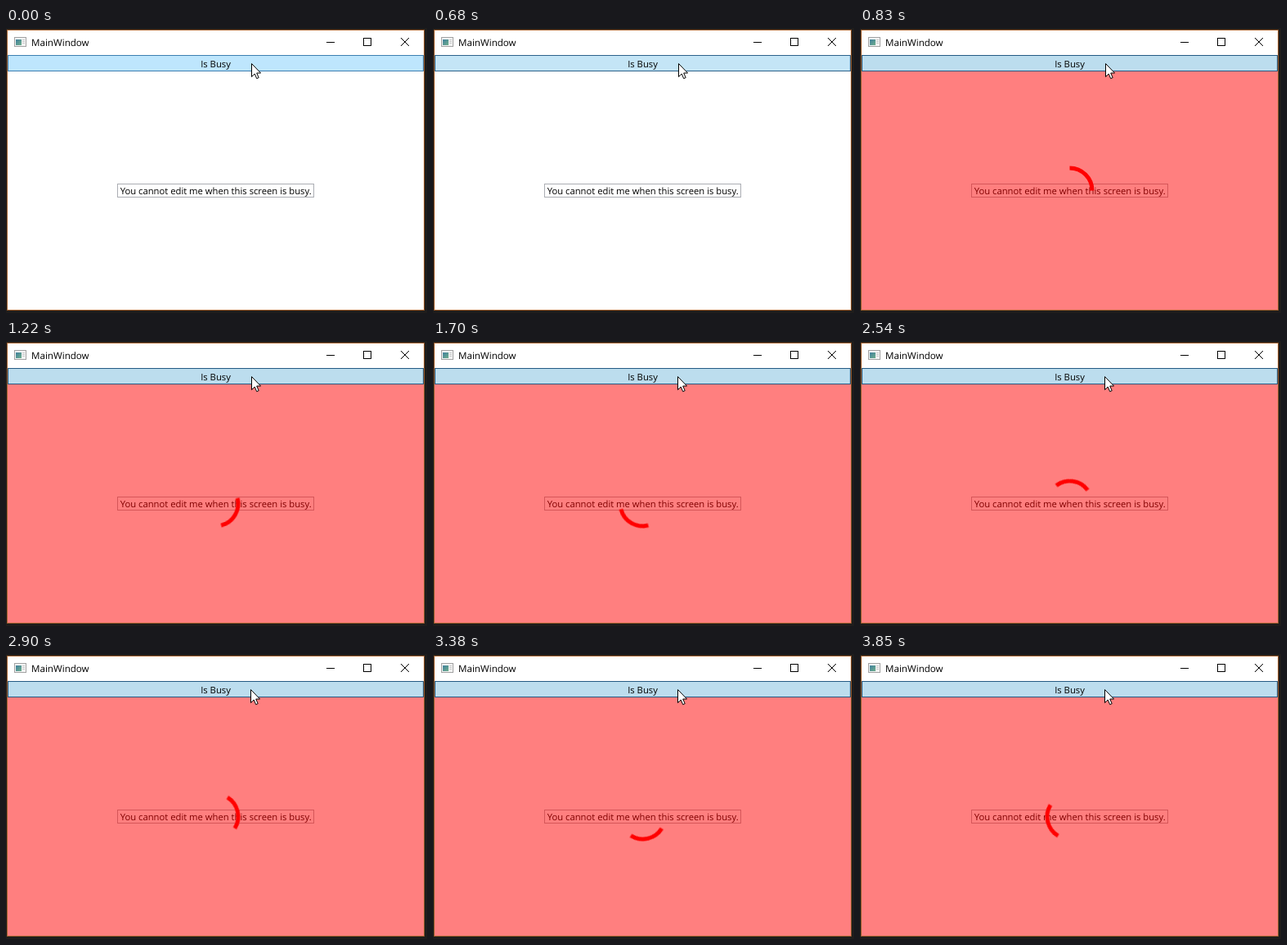
Animation of 515 by 348 pixels, one loop 3950 ms. Source, as an HTML page:

```html
<!DOCTYPE html>
<html lang="en">
<head>
<meta charset="utf-8">
<title>Busy overlay</title>
<style>
  html, body {
    margin: 0;
    width: 100%;
    height: 100%;
    overflow: hidden;
    background: #1f1d1c;
  }
  svg { display: block; }
  text {
    font: 11.25px "Open Sans", "Noto Sans", sans-serif;
    text-rendering: geometricPrecision;
    fill: #000;
  }
  .title { font-size: 11.6px; }
  .middle { text-anchor: middle; }

  .toggle, .busy, .cursor { animation: 3950ms step-end infinite; }
  .toggle { animation-name: toggle; }
  .busy { animation-name: busy; }
  .cursor { animation-name: nudge; }
  .spinner {
    transform-origin: 256.5px 198.5px;
    animation: spin 3950ms step-end infinite;
  }

  /* hover, pressed, checked */
  @keyframes toggle {
    0% { fill: #bee6fd; stroke: #3c7fb1; }
    17.215% { fill: #c4e5f6; stroke: #2c628b; }
    21.012%, 100% { fill: #bcddee; stroke: #245a83; }
  }
  @keyframes busy {
    0% { visibility: hidden; }
    21.012%, 100% { visibility: visible; }
  }
  @keyframes nudge {
    0% { transform: translate(300px, 43px); }
    40.759%, 100% { transform: translate(299px, 43px); }
  }
  /* one tick every 30 ms, with a short stall near 75% */
  @keyframes spin {
    0% { transform: rotate(0deg); }
    21.012% { transform: rotate(0deg); animation-timing-function: steps(13); }
    30.886% { transform: rotate(76deg); animation-timing-function: steps(32); }
    55.189% { transform: rotate(255deg); animation-timing-function: steps(26); }
    74.936% { transform: rotate(403deg); }
    76.455% { transform: rotate(414deg); animation-timing-function: steps(27); }
    96.962% { transform: rotate(567deg); }
    97.468%, 100% { transform: rotate(571deg); }
  }
</style>
</head>
<body>
<svg width="515" height="348" viewBox="0 0 515 348">
  <defs>
    <linearGradient id="pane" x2="1" y2="1">
      <stop stop-color="#3f7f9c"/>
      <stop offset="1" stop-color="#6fae8c"/>
    </linearGradient>
  </defs>

  <!-- window -->
  <rect x="1.5" y="2.5" width="510" height="342" fill="#fff" stroke="#a5622f"/>

  <!-- title bar -->
  <rect x="10.5" y="11.5" width="14" height="11" fill="#f4f4f4" stroke="#a2a2a2"/>
  <rect x="12" y="14" width="7" height="7" fill="url(#pane)"/>
  <path d="M20 14.5h3M20 16.5h3M20 18.5h3" stroke="#c9c9c9"/>
  <text class="title" x="31" y="22">MainWindow</text>
  <g fill="none" stroke="#000">
    <path d="M392 17.5h10"/>
    <rect x="437.5" y="12.5" width="9" height="9"/>
    <path d="M483 12l10 10M493 12l-10 10"/>
  </g>

  <!-- content -->
  <rect class="toggle" x="2.5" y="33.5" width="508" height="19"/>
  <text class="middle" x="256.5" y="48">Is Busy</text>
  <rect x="136.5" y="190.5" width="240" height="16" fill="#fff" stroke="#abadb3"/>
  <text class="middle" x="256.7" y="203">You cannot edit me when this screen is busy.</text>

  <g class="busy">
    <rect x="2" y="53" width="509" height="291" fill="#f00" fill-opacity=".5"/>
    <path class="spinner" d="M256.5 171A27.5 27.5 0 0 1 284 198.5" fill="none" stroke="#f00" stroke-width="5"/>
  </g>

  <path class="cursor" d="M.5 .5V16.6L4.2 13L6.7 18.7L9.2 17.6L6.7 12H11.6Z" fill="#fff" stroke="#000"/>
</svg>
</body>
</html>
```
